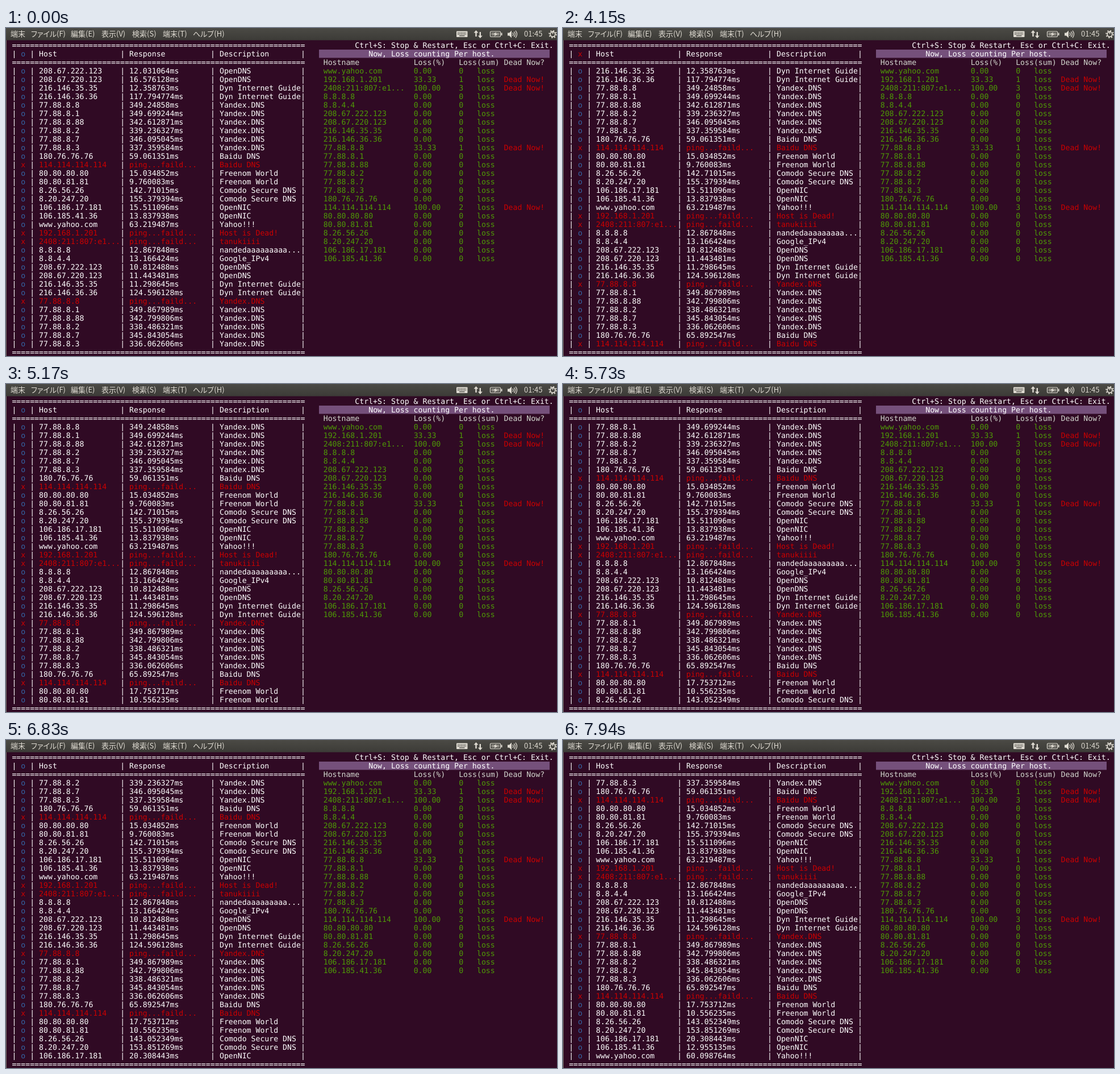
An HTML page that plays this animation: 970 px wide and 577 px high, repeating every 8 s.

```html
<!DOCTYPE html>
<html lang="ja">
<head>
<meta charset="utf-8">
<style>
  html, body { margin: 0; width: 100%; height: 100%; overflow: hidden; background: #300a24; }
  svg { display: block; }
  #term { font: 13.2px "DejaVu Sans Mono", monospace; text-rendering: geometricPrecision; }
  #bar { font: 13px "Noto Sans CJK JP", "Noto Sans CJK", sans-serif; fill: #dfdbd2; }
  .kana { font-feature-settings: "palt"; }
</style>
</head>
<body>
<svg width="970" height="577" viewBox="0 0 970 577">
  <defs>
    <linearGradient id="shade" x2="0" y2="1">
      <stop stop-color="#4b4a45"/><stop offset="1" stop-color="#3c3b37"/>
    </linearGradient>
    <clipPath id="view"><rect y="68.5" width="540" height="495"/></clipPath>
  </defs>
  <rect width="970" height="577" fill="#300a24"/>
  <rect y="21" width="1" height="556" fill="#77726b"/>
  <rect width="970" height="21.5" fill="url(#shade)"/>

  <g id="bar">
    <text x="8" y="15">端末</text>
    <text x="44" y="15" class="kana">ファイル(F)</text>
    <text x="114" y="15">編集(E)</text>
    <text x="168" y="15">表示(V)</text>
    <text x="222" y="15">検索(S)</text>
    <text x="276" y="15">端末(T)</text>
    <text x="329" y="15" class="kana">ヘルプ(H)</text>
    <text x="912" y="15">01:45</text>
    <!-- keyboard -->
    <rect x="793" y="5.5" width="19.5" height="10.5" rx="1"/>
    <path d="M795 8.5h15.500M795 11h15.500" stroke="#45443f" stroke-width="1.300" stroke-dasharray="1.500 1"/>
    <path d="M798 13.700h9.500" stroke="#45443f" stroke-width="1.300"/>
    <!-- network arrows -->
    <path d="M827.500 4l4 4.500h-2.800v6.500h-2.400v-6.500h-2.800zM834.800 18l-4-4.500h2.800v-6.500h2.400v6.500h2.800z"/>
    <!-- battery -->
    <rect x="852.500" y="6" width="18" height="9.500" rx="1.500" fill="none" stroke="#dfdbd2" stroke-width="1.200"/>
    <path d="M871.500 8.500h2v4.500h-2z"/>
    <rect x="854.500" y="8" width="14" height="5.500" fill="#8c8982"/>
    <path d="M863 7l-5 4.300h3l-1.500 3.700 6-4.700h-3.300z"/>
    <!-- speaker -->
    <path d="M883 8.500h3l4-4v13l-4-4h-3z"/>
    <path d="M892 8q2 3 0 6M894.500 6.300q3.500 4.700 0 9.400M897 4.700q5 6.300 0 12.600" fill="none" stroke="#dfdbd2" stroke-width="1.300"/>
    <!-- gear -->
    <g fill="none" stroke="#dfdbd2">
      <circle cx="962.500" cy="11" r="4.300" stroke-width="1.700"/>
      <circle cx="962.500" cy="11" r="6.200" stroke-width="2.200" stroke-dasharray="2 2.870"/>
      <path d="M962.500 5v5.500" stroke-width="1.700"/>
    </g>
  </g>

  <g id="term">
    <rect x="551" y="38" width="406" height="14.500" fill="#75507b"/>
    <g clip-path="url(#view)"><g id="log"></g></g>
  </g>
</svg>
<script>
const WHITE = '#fff', GREY = '#d3d7cf', RED = '#cc0000', GREEN = '#4e9a06', BLUE = '#3465a4';
const CELL = 7.947, LINE = 15, VISIBLE = 33;

const hosts = `208.67.222.123,OpenDNS
208.67.220.123,OpenDNS
216.146.35.35,Dyn Internet Guide
216.146.36.36,Dyn Internet Guide
77.88.8.8,Yandex.DNS
77.88.8.1,Yandex.DNS
77.88.8.88,Yandex.DNS
77.88.8.2,Yandex.DNS
77.88.8.7,Yandex.DNS
77.88.8.3,Yandex.DNS
180.76.76.76,Baidu DNS
114.114.114.114,Baidu DNS
80.80.80.80,Freenom World
80.80.81.81,Freenom World
8.26.56.26,Comodo Secure DNS
8.20.247.20,Comodo Secure DNS
106.186.17.181,OpenNIC
106.185.41.36,OpenNIC
www.yahoo.com,Yahoo!!!
192.168.1.201,Host is Dead!
2408:211:807:e1...,tanukiiii
8.8.8.8,nandedaaaaaaaaa...
8.8.4.4,Google_IPv4`.split('\n').map(s => s.split(','));

// Response times in order of arrival; 0 is a failed ping.
const pings = [
  12.031064, 16.576128, 12.358763, 117.794774, 349.24858, 349.699244, 342.612871,
  339.236327, 346.095045, 337.359584, 59.061351, 0, 15.034852, 9.760083, 142.71015,
  155.379394, 15.511096, 13.837938, 63.219487, 0, 0, 12.867848, 13.166424,
  10.812488, 11.443481, 11.298645, 124.596128, 0, 349.867989, 342.799806,
  338.486321, 345.843054, 336.062606, 65.892547, 0, 17.753712, 10.556235,
  143.052349, 153.851269, 20.308443, 12.955135, 60.098764
];
const arrivals = [560, 4150, 4590, 5170, 5730, 6270, 6830, 7260, 7940];
const losses = { 4: ['33.33', 1], 11: ['100.00', 2], 19: ['33.33', 1], 20: ['100.00', 3] };

const term = document.getElementById('term');
const log = document.getElementById('log');

function put(col, row, str, fill = WHITE, parent = term) {
  const el = document.createElementNS('http://www.w3.org/2000/svg', 'text');
  el.setAttribute('x', 10.4 + col * CELL);
  el.setAttribute('y', 35 + row * LINE);
  el.setAttribute('fill', fill);
  el.textContent = str;
  return parent.appendChild(el);
}

function tableRow(row, fields, fill, parent) {
  for (const col of [0, 4, 24, 44, 64]) put(col, row, '|', WHITE, parent);
  fields.forEach((str, i) => put(6 + 20 * i, row, str, fill, parent));
}

function setMark(el, ping) {
  el.textContent = ping ? 'o' : 'x';
  el.setAttribute('fill', ping ? BLUE : RED);
}

for (const row of [0, 2, 36]) put(0, row, '='.repeat(65));
tableRow(1, ['Host', 'Response', 'Description'], WHITE, term);
const status = put(2, 1, 'o');

pings.forEach((ping, i) => {
  const [host, note] = hosts[i % hosts.length];
  const result = ping ? ping + 'ms' : 'ping...faild...';
  tableRow(i + 3, [host, result, note], ping ? WHITE : RED, log);
  setMark(put(2, i + 3, 'o', BLUE, log), ping);
});

put(76, 0, 'Ctrl+S: Stop & Restart, Esc or Ctrl+C: Exit.');
put(79, 1, 'Now, Loss counting Per host.');
put(69, 2, 'Hostname', GREY);
put(89, 2, 'Loss(%)', GREY);
put(99, 2, 'Loss(sum)', GREY);
put(109, 2, 'Dead Now?', GREY);

const sums = [];
hosts.forEach((_, i) => {
  const id = (i + 18) % hosts.length, row = i + 3;
  const [rate, sum] = losses[id] || ['0.00', 0];
  put(69, row, hosts[id][0], GREEN);
  put(89, row, rate, GREEN);
  sums[id] = put(99, row, sum, GREEN);
  put(103, row, 'loss', GREEN);
  if (sum) put(109, row, 'Dead Now!', RED);
});

function draw() {
  const t = performance.now() % 8000;
  const shift = arrivals.filter(a => t >= a).length;
  log.setAttribute('transform', `translate(0 ${-shift * LINE})`);
  setMark(status, pings[shift + VISIBLE - 1]);
  sums[11].textContent = shift < 2 ? 2 : 3;
  requestAnimationFrame(draw);
}
draw();
</script>
</body>
</html>
```
